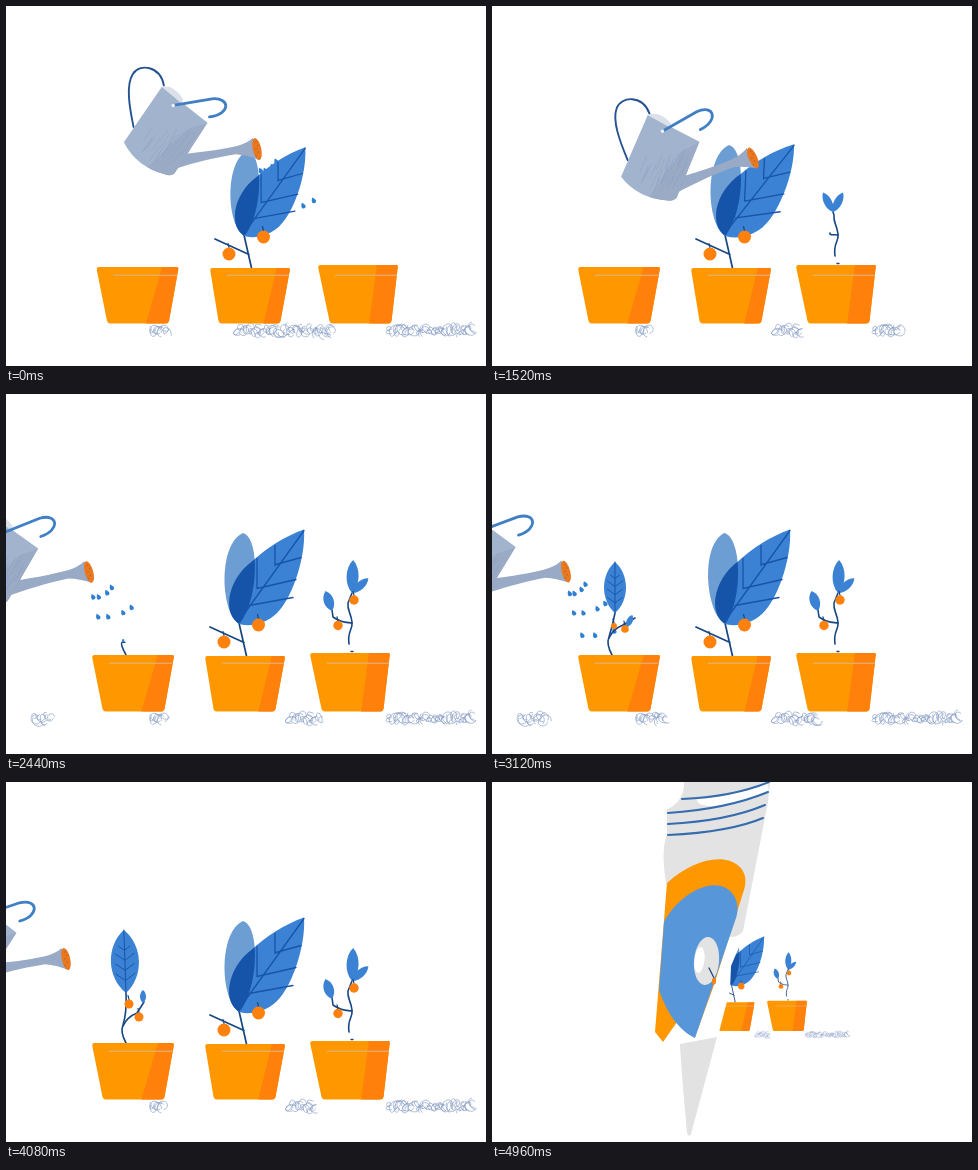
Write an HTML page with a canvas that moves like this. It is 480 px wide and 360 px high and loops after 5000 ms.

```html
<!DOCTYPE html>
<html lang="en">
<head>
<meta charset="utf-8">
<title>Watering plants</title>
<style>
  html, body { margin: 0; width: 100%; height: 100%; overflow: hidden; background: #fff; }
  canvas { display: block; width: 480px; height: 360px; }
</style>
</head>
<body>
<canvas id="stage" width="480" height="360"></canvas>
<script>
const ctx = document.getElementById('stage').getContext('2d');
const LOOP = 5000, STEP = 40, RAD = Math.PI / 180;
const NAVY = '#174783', BLUE = '#3b82d4', DEEP = '#1654a9', PALE = '#6c9dd3';
const ORANGE = '#ff9800', RUST = '#ff800b', FRUIT = '#ff810d', METAL = '#a2b4cd', SHADE = '#90a3c1';

const mix = (a, b, k) => a + (b - a) * k;

// Smooth 0 to 1 between two times.
function between(t, a, b) {
  const v = Math.max(0, Math.min(1, (t - a) / (b - a)));
  return v * v * (3 - 2 * v);
}

// Rises to 1 around a moment and falls back.
const bump = (t, center, spread) => Math.exp(-(((t - center) / spread) ** 2));

function random(seed) {
  return () => {
    seed = (seed * 16807 + 11) % 2147483647;
    return seed / 2147483647;
  };
}

function fill(path, color) {
  ctx.fillStyle = color;
  ctx.fill(new Path2D(path));
}

function line(path, color, width) {
  ctx.strokeStyle = color;
  ctx.lineWidth = width;
  ctx.stroke(new Path2D(path));
}

function oval(x, y, rx, ry, angle, color) {
  ctx.fillStyle = color;
  ctx.beginPath();
  ctx.ellipse(x, y, rx, ry, angle * RAD, 0, 7);
  ctx.fill();
}

function placed(x, y, angle, scale, draw) {
  ctx.save();
  ctx.translate(x, y);
  ctx.rotate(angle * RAD);
  ctx.scale(scale, scale);
  draw();
  ctx.restore();
}

function fruit(x, y, r) {
  if (r < 0.3) return;
  line(`M${x} ${y - r}l-1 -4`, NAVY, 1.2);
  oval(x, y, r, r, 0, FRUIT);
}

// A leaf grows upward from its base.
function leaf(x, y, angle, length, width, veins) {
  if (length < 1) return;
  placed(x, y, angle, 1, () => {
    const c = width / 0.75, low = -length * 0.25, high = -length * 0.75;
    fill(`M0 0C${-c} ${low} ${-c} ${high} 0 ${-length}C${c} ${high} ${c} ${low} 0 0Z`, BLUE);
    if (!veins) return;
    line(`M0 0V${-length}`, DEEP, 1);
    for (let i = 1; i < 5; i++) {
      const v = -length * (0.04 + i * 0.16), w = width * (i > 3 ? 0.4 : 0.68);
      line(`M${-w} ${v - w * 0.7}L0 ${v}L${w} ${v - w * 0.7}`, DEEP, 0.9);
    }
  });
}

function pot(left, top, width, inset, shift, darkTop, darkBottom) {
  const right = left + width, base = left + inset;
  ctx.save();
  ctx.translate(shift, 0);
  const outline = `M${left + 2} ${top}H${right - 1}Q${right + 1} ${top} ${right} ${top + 4}` +
    `L${base + 61} 315Q${base + 60} 317.5 ${base + 58} 317.5H${base + 2}Q${base} 317.5 ${base - 1} 315` +
    `L${left} ${top + 4}Q${left - 1} ${top} ${left + 2} ${top}Z`;
  fill(outline, ORANGE);
  ctx.clip(new Path2D(outline));
  fill(`M${darkTop} ${top - 1}H${right + 3}V319H${darkBottom}Z`, RUST);
  line(`M${left + 17} 269.3H${right - 1}`, '#dfb58a', 1.1);
  ctx.restore();
}

// Pencil curls wandering over a strip of ground.
function scribble(seed, x, width) {
  if (width < 6) return;
  const rnd = random(seed * 977);
  ctx.strokeStyle = 'rgba(125,149,192,.6)';
  ctx.lineWidth = 1;
  ctx.beginPath();
  for (let d = 3; d < width - 3; d += 1.9) {
    const rx = 2 + rnd() * 4, ry = 2 + rnd() * 4;
    const cx = Math.max(rx, Math.min(width - rx, d));
    const cy = mix(318 + ry, 332 - ry, rnd()), tilt = rnd() * 3, turn = 3 + rnd() * 2;
    ctx.moveTo(x + cx + rx * Math.cos(tilt), cy + rx * Math.sin(tilt));
    ctx.ellipse(x + cx, cy, rx, ry, tilt, 0, turn);
  }
  ctx.stroke();
}

function shadows(t) {
  scribble(3, 143, 18 + 42 * bump(t, 600, 400) + 18 * bump(t, 3120, 500));
  scribble(5, mix(280, 228, bump(t, 0, 300)), 34 + 70 * bump(t, 0, 300) + 18 * bump(t, 3000, 500));
  scribble(8, 380, 93 - 60 * bump(t, 1520, 400));
  scribble(12, 25, 46 * bump(t, 2850, 500));
}

// Position of the rose, tilt of the can, swing of its front handle.
function canPose(t) {
  const arrive = between(t, 0, 500), tip = between(t, 1120, 1500);
  const travel = between(t, 1560, 2240), drift = between(t, 2400, 4080), leave = between(t, 4080, 4480);
  return {
    x: 251 + 21 * arrive - 11 * tip - 178 * travel - 23 * drift - 75 * leave,
    y: 143 + 5 * arrive + 4 * tip + 26 * travel - 1 * drift,
    angle: arrive - 1 - 12 * tip + 8 * travel + 3 * drift,
    swing: -9 * tip
  };
}

// Rows of four drops spread apart as they fall.
function pour(t, rose, start, gap, rows) {
  for (let row = 0; row < rows; row++) {
    const k = (t - start - row * gap) / 303;
    if (k < 0.05 || k > 4) continue;
    [0, 0.3, 0.75, 1].forEach((spread, i) => {
      const x = rose.x + mix(3 + 3.1 * k * k, 7.5 + 25 * k, spread);
      const y = rose.y + 12 + 20 * k + 2.5 * k * k - 1.6 * i * i * (i > 1) * 0.65;
      if (y > 252) return;
      placed(x, y, -25, 1, () => fill('M0 -3.4Q3 0 1.8 2Q0 3.2 -1.8 2Q-3 0 0 -3.4Z', '#2d7fd2'));
    });
  }
}

function bigPlant(t, shift) {
  const grown = 0.94 + 0.06 * between(t, 0, 300);
  const sway = 2.5 * bump(t, 1520, 300), tilt = -3 * bump(t, 3120, 300);
  ctx.save();
  ctx.translate(shift, 0);
  line('M240.5 262L233 229M204 233L238 248.5', NAVY, 1.7);

  const back = new Path2D('M0 0C-19 -12 -21 -80 4 -91C21 -86 20 -25 0 0Z');
  const front = new Path2D('M-1 0C-20 -8 -16 -44 10 -63C24 -76 42 -88 62 -95C64 -66 49 -21 31 -8C20 0 8 2 -1 0Z');
  placed(233, 230, tilt, grown, () => { ctx.fillStyle = PALE; ctx.fill(back); });
  placed(236, 230.5, sway, grown, () => {
    ctx.fillStyle = BLUE;
    ctx.fill(front);
    ctx.save();
    ctx.clip(front);
    ctx.translate(-3, 0);
    ctx.rotate((tilt - sway) * RAD);
    ctx.fillStyle = DEEP;
    ctx.fill(back);
    ctx.restore();
    line('M62 -94L-4 -2M34 -60L59 -67M33 -59V-79M15 -36L54 -45M15 -36V-66M7 -19L51 -27', DEEP, 1.3);
  });
  fruit(218, 248, 6.5);
  fruit(252.5, 231, 6.5);
  ctx.restore();
}

function rightPlant(t) {
  const sprout = between(t, 850, 1450), full = between(t, 1700, 2250);
  if (!sprout) return;
  placed(344, 259, 0, sprout, () => {
    ctx.translate(-344, -259);
    const x = mix(341, 346, full), y = mix(206, 199, full);
    line(`M343 250C341 237 347 236 346 228C345 219 341 216 342 209L${x} ${y}`, NAVY, 1.6);
    line('M345 257.5h2', NAVY, 1.3);
    line(`M346 229C342 228 337 230 ${mix(338, 327, full)} ${mix(227, 223, full)}L${mix(338, 326, full)} ${mix(227, 216, full)}`, NAVY, 1.6);
    leaf(x, y, mix(-27, 2, full), mix(22, 33, full), mix(4, 6, full));
    leaf(x, y, mix(27, 48, full), 22, 4);
    leaf(326, 217, -18, 21 * full, 5 * full);
    fruit(348, 206, 4.7 * full);
    fruit(332, 231.5, 4.7 * full);
  });
}

function leftPlant(t) {
  if (t < 2300) return;
  const stem = between(t, 2280, 2560), grow = between(t, 2480, 3060), late = between(t, 3120, 3600);
  const branch = between(t, 2650, 3100);
  const x = 119 - 3 * stem + 7 * grow - 3 * late, y = 261 - 21 * stem - 21 * grow - 8 * late;
  line(`M120 261Q114 250 ${116 + branch} ${Math.max(y, 243)}Q121 ${mix(y, 230, branch)} ${x} ${y}`, NAVY, 1.6);
  if (branch) {
    const tipX = mix(117, 143 - 5 * late, branch), tipY = mix(243, 224 - 4 * late, branch);
    line(`M117 244Q${117 + 4 * branch} 235 ${117 + 14 * branch} ${243 - 12 * branch}L${tipX} ${tipY}`, NAVY, 1.6);
    leaf(135 + 2 * late, 233 - 12 * late, 24 - 24 * late, 13 * branch, 3);
    fruit(122 + late, 232 - 10 * late, (3 + 1.5 * late) * branch);
    fruit(133, 235, (3.8 + 0.7 * late) * branch);
  }
  leaf(x, y, -2 * late, 6 * stem + 45 * grow + 12 * late, 2 * stem + 9 * grow + 3 * late, grow > 0.3);
}

function wateringCan({ x, y, angle, swing }) {
  placed(x, y, angle, 1, () => {
    ctx.translate(-272, -148);
    line('M149 124C145 103 142 82 149 71C156 60 177 63 180 83', '#245292', 1.9);
    fill('M188 152C211 151 234 148 250 145Q261 143 268 137L274 159Q262 154 251 153C230 156 211 160 188 167Z', '#98aac5');
    const body = 'M178 84L223 121L189 171Q185 174 180 172Q151 164 139 139Z';
    fill(body, METAL);
    ctx.save();
    ctx.clip(new Path2D(body));
    fill('M223 121L203 127L160 166L188 176Z', '#9babc5');
    const rnd = random(41);
    for (let i = 0; i < 34; i++) {
      line(`M${158 + rnd() * 44} ${137 + rnd() * 28}l9 -13`, SHADE, 0.6);
    }
    ctx.restore();
    fill('M178 84Q190 82 199 97L197 101Z', '#dce1e9');
    placed(189, 103, swing, 1, () => line('M0 0L39 -6C58 -7 57 10 36 12', '#417fc4', 2.8));
    oval(189, 103, 1.8, 1.8, 0, '#edf3fa');
    oval(272, 148, 4.2, 11.2, -12, '#e97820');
    for (let i = 0; i < 5; i++) oval(271 + i % 2 * 2, 141 + i * 3.4, 0.7, 0.7, 0, '#b66127');
  });
}

function scene(t) {
  const zoom = between(t, 4500, 4960), offset = 1 - between(t, 0, 300);
  const pose = canPose(t);
  ctx.save();
  ctx.transform(mix(1, 0.5, zoom), 0, 0, mix(1, 0.52, zoom), 123 * zoom, 84 * zoom);
  shadows(t);
  pour(t, pose, -596, 227, 4);
  pour(t, pose, 2016, 240, 5);
  bigPlant(t, 5 * offset);
  leftPlant(t);
  rightPlant(t);
  pot(86.5, 261, 81, 11, 4.5 * offset, 152, 135);
  pot(199.5, 262, 79, 9, 5 * offset, 266, 252);
  pot(304.5, 259, 79, 12, 8 * offset, 363, 355);
  if (t < 4500) wateringCan(pose);
  ctx.restore();
}

function fallingTube(t) {
  if (t < 4600) return;
  ctx.save();
  ctx.translate(0, -365 * (1 - between(t, 4600, 4960)));
  fill('M163 0H278L252 153L239 184L238 208L227 250L225 258L197 356L163 262Z', '#fff');
  fill('M174 0H278L276 20L251 149Q247 155 238 155L175 105Q168 70 175 53Z', '#e3e3e3');
  fill('M170 0H192Q193 18 176 27H170Z', '#fff');
  fill('M205 17Q238 16 275 -1L277 10Q246 23 220 24Q205 24 205 17Z', '#fff');
  line('M190 17Q240 15 277 0M176 31Q235 27 276 10M176 42Q235 39 273 23M176 53Q238 50 271 36', '#356cad', 2);
  fill('M175 101C195 82 222 73 238 79C252 84 257 96 251 111L222 203L203 255L185 240L171 260L163 250Z', ORANGE);
  fill('M172 140C184 117 210 99 229 104C245 109 248 125 244 136L203 256C186 248 174 229 167 208Z', '#5797d9');
  oval(214.5, 179, 12.5, 24, 5, '#e3e3e3');
  oval(207.5, 178, 5, 13, 6, '#fff');
  line('M217 186L223 198', NAVY, 1.3);
  oval(222, 199, 2, 3.5, 0, FRUIT);
  fill('M188 262L225 255L199 352Q197 356 195 351Q189 285 188 262Z', '#e2e2e2');
  ctx.restore();
}

function frame(now) {
  const t = Math.floor(Math.max(0, now - begin) % LOOP / STEP) * STEP;
  ctx.fillStyle = '#fff';
  ctx.fillRect(0, 0, 480, 360);
  ctx.lineCap = ctx.lineJoin = 'round';
  scene(t);
  fallingTube(t);
  requestAnimationFrame(frame);
}

const begin = performance.now();
frame(begin);
</script>
</body>
</html>
```
